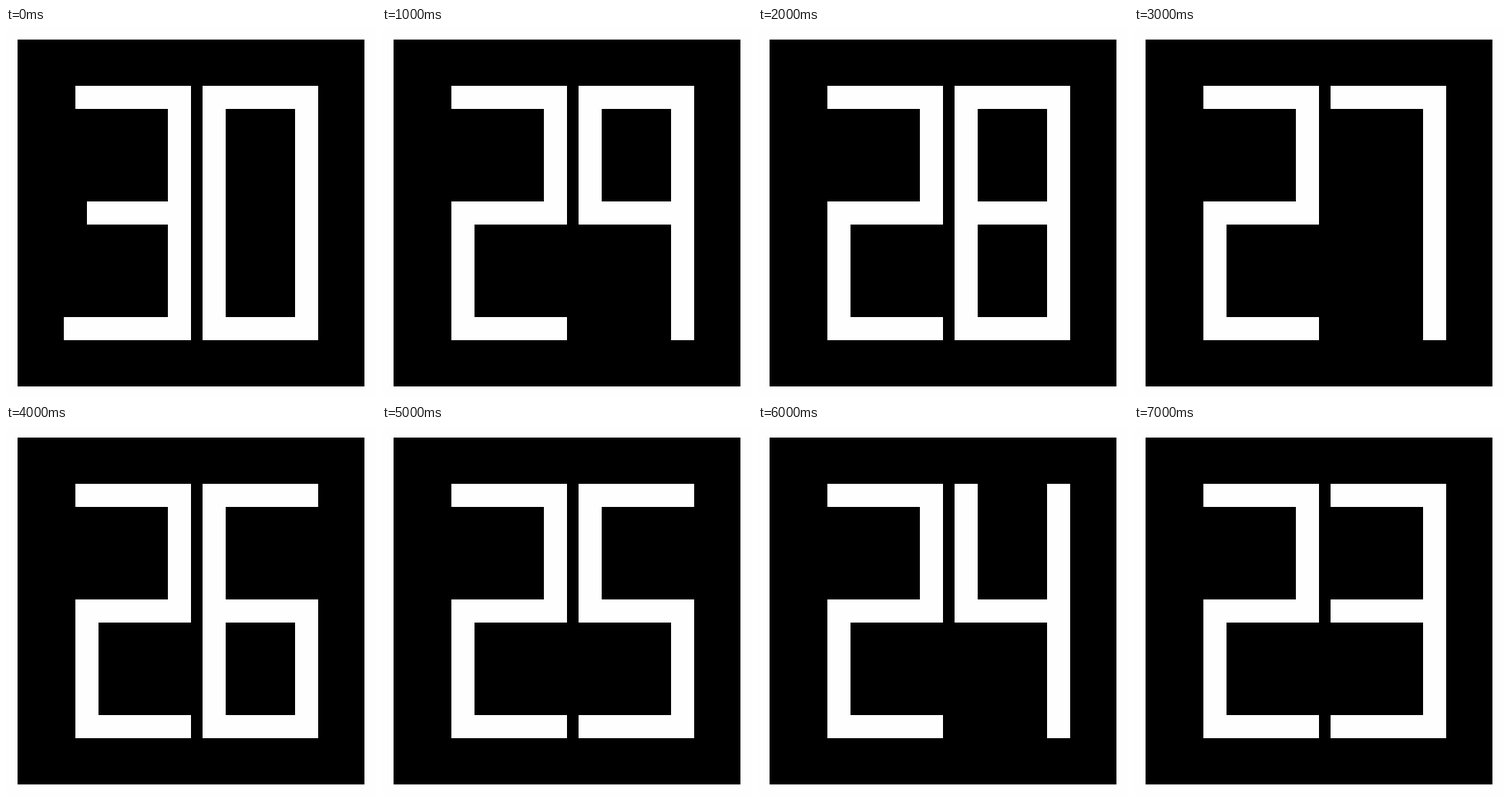
Animation, 512 px wide and 512 px high, one loop 8000 ms. Source, as an HTML page with a canvas:

```html
<!DOCTYPE html>
<html>
<head>
<meta charset="utf-8">
<title>Countdown</title>
<style>
html, body { margin: 0; height: 100%; overflow: hidden; background: #fefefe; }
canvas { display: block; }
</style>
</head>
<body>
<canvas id="stage" width="512" height="512"></canvas>
<script>
const ctx = document.getElementById('stage').getContext('2d');
const CELL = 16, START = 30, STEPS = 8;

// Segment boxes in cells, relative to a digit's top left corner: x, y, w, h
const SEGMENTS = {
  a: [0, 0, 10, 2], b: [8, 0, 2, 12], c: [8, 10, 2, 12], d: [0, 20, 10, 2],
  e: [0, 10, 2, 12], f: [0, 0, 2, 12], g: [0, 10, 10, 2]
};
const DIGITS = ['abcdef', 'bc', 'abged', 'abgcd', 'fgbc', 'afgcd', 'afgedc', 'abc', 'abcdefg', 'abcfg'];

function box(x, y, w, h) {
  ctx.fillRect(x * CELL, y * CELL, w * CELL, h * CELL);
}

function drawDigit(digit, left) {
  for (const name of DIGITS[digit]) {
    const [x, y, w, h] = SEGMENTS[name];
    box(left + x, 5 + y, w, h);
  }
}

// The leading 3 has a short middle bar and a long bottom bar
function drawLeadingThree() {
  box(6, 5, 10, 2);
  box(7, 15, 9, 2);
  box(5, 25, 11, 2);
  box(14, 5, 2, 22);
}

function draw(value) {
  ctx.fillStyle = '#fefefe';
  box(0, 0, 32, 32);
  ctx.fillStyle = '#000';
  box(1, 1, 30, 30);
  ctx.fillStyle = '#fefefe';
  const tens = Math.floor(value / 10);
  if (tens === 3) drawLeadingThree();
  else drawDigit(tens, 6);
  drawDigit(value % 10, 17);
}

function tick() {
  draw(START - Math.floor(performance.now() / 1000) % STEPS);
  requestAnimationFrame(tick);
}
tick();
</script>
</body>
</html>
```
